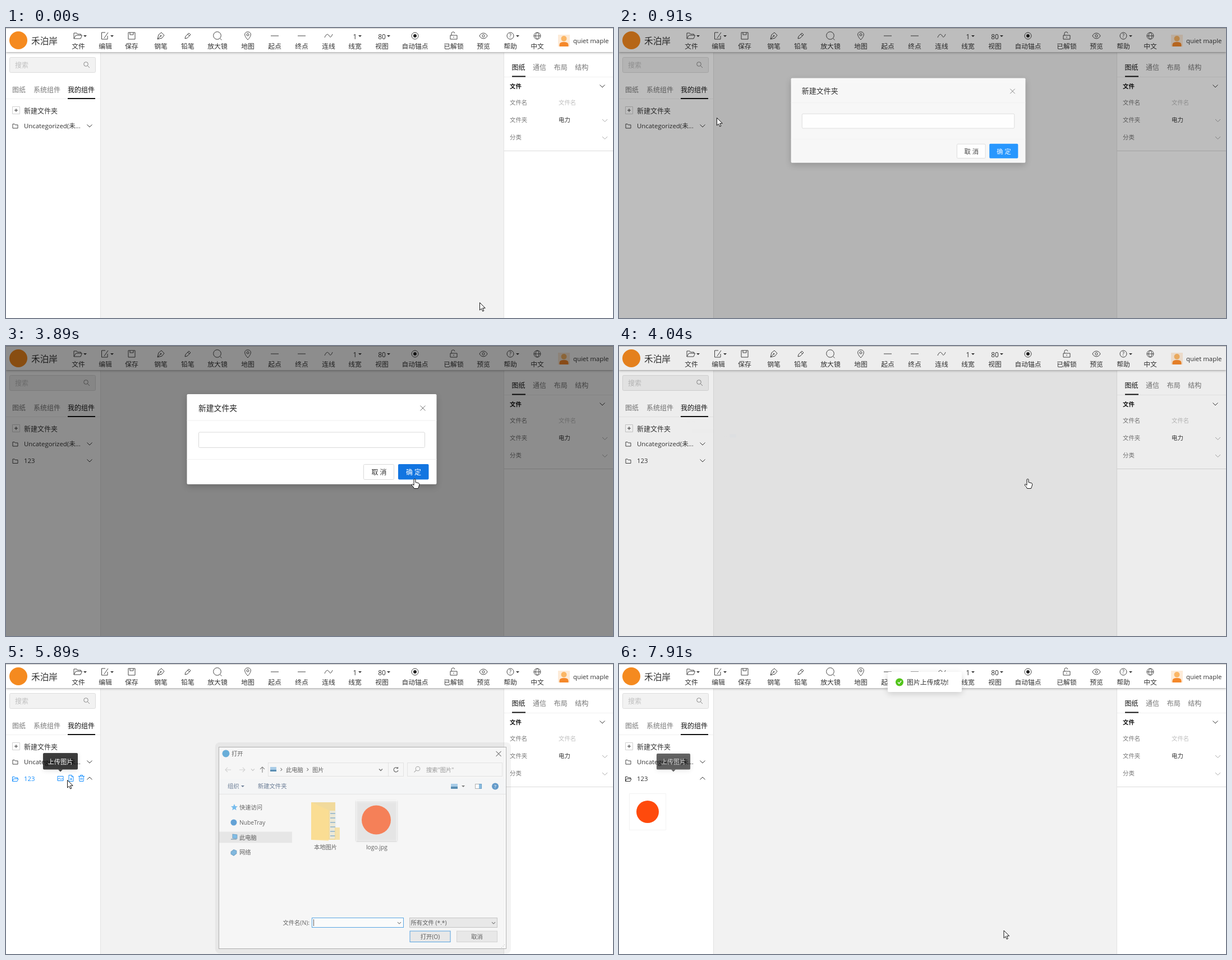
An HTML page with a canvas for the animation above (7990 ms loop, 1082x518 px).

```html
<!DOCTYPE html>
<html lang="zh">
<head>
<meta charset="utf-8">
<style>
  html, body { margin: 0; width: 100%; height: 100%; overflow: hidden; background: #fff; }
  canvas { display: block; width: 1082px; height: 518px; }
</style>
</head>
<body>
<canvas id="stage"></canvas>
<script>
const W = 1082, H = 518, LOOP = 7990;
const FONT = '"Open Sans","Noto Sans CJK SC","Noto Sans CJK",sans-serif';
const INK = '#333', GRAY = '#777', PALE = '#bfbfbf', BLUE = '#1890ff', RED = '#ff4a0c';
const stage = document.getElementById('stage'), c = stage.getContext('2d');
const dpr = window.devicePixelRatio || 1;
stage.width = W * dpr;
stage.height = H * dpr;

const progress = (t, a, b) => Math.min(1, Math.max(0, (t - a) / (b - a)));
const smooth = u => u * u * (3 - 2 * u);
const inOut = u => u < .5 ? 4 * u ** 3 : 1 - 4 * (1 - u) ** 3;
const circle = (r, x = 0, y = 0) => `M${x + r} ${y}a${r} ${r} 0 1 1 ${-2 * r} 0a${r} ${r} 0 1 1 ${2 * r} 0`;

// y is the vertical middle of the glyphs
function text(str, x, y, size = 12, color = INK, align = 'left', weight = 400) {
  c.font = `${weight} ${size}px ${FONT}`;
  c.textAlign = align;
  c.fillStyle = color;
  c.fillText(str, x, y + size * .38);
}
function box(x, y, w, h, fill, stroke, r = 0) {
  c.beginPath();
  c.roundRect(x, y, w, h, r);
  if (fill) { c.fillStyle = fill; c.fill(); }
  if (stroke) { c.strokeStyle = stroke; c.lineWidth = 1; c.stroke(); }
}
function icon(path, x, y, stroke = INK, fill, width = 1) {
  const p = new Path2D(path);
  c.save();
  c.translate(x, y);
  if (fill) { c.fillStyle = fill; c.fill(p); }
  if (stroke) { c.strokeStyle = stroke; c.lineWidth = width; c.stroke(p); }
  c.restore();
}
function shadowed(blur, dy, alpha, draw) {
  c.save();
  c.shadowColor = `rgba(0,0,0,${alpha})`;
  c.shadowBlur = blur;
  c.shadowOffsetY = dy;
  draw();
  c.restore();
}
function scaled(s, ox, oy, alpha, draw) {
  c.save();
  c.globalAlpha = alpha;
  c.translate(ox, oy);
  c.scale(s, s);
  c.translate(-ox, -oy);
  draw();
  c.restore();
}

const DOWN = 'M-4.5-2L0 2.5 4.5-2', UP = 'M-4.5 2L0-2.5 4.5 2', RIGHT = 'M-1.5-2.5L1 0-1.5 2.5';
const SMALL_DOWN = 'M-3-1.5L0 1.5 3-1.5', CARET_DOWN = 'M-3-1.5H3L0 1.5z';
const CROSS = 'M-4.5-4.5l9 9M4.5-4.5l-9 9';
const SEARCH = circle(3.8, -1, -1) + 'M2 2l3.5 3.5';
const FOLDER = 'M-4.5-3.5h3.2l1.2 1.5h4.6v6h-9z';
const OPEN_FOLDER = 'M-5 4v-8h3.5l1.2 1.5h4.3v2M-5 4l2-4.5h8.5l-2 4.5z';

const TOOLS = [
  ['文件', 129, 'M-7-5h5l1.5 2h6v2M-7-5V5H5l2.5-6h-11L-7 5', 128, 141],
  ['编辑', 177, 'M1-6h-6.5V6H5V0M6-6L-1 4', 176, 189],
  ['保存', 224, 'M-6-6H6V6H-6zM-3-6v4h6v-4', 224],
  ['钢笔', 276, 'M-6 6l2-8 5-4 5 5-4 5zM-6 6l5.5-5.5' + circle(1, 0, 0), 276],
  ['铅笔', 324, 'M-5 5l1-4 6-6 3 3-6 6zM0-3l3 3', 324],
  ['放大镜', 377, circle(6.8, -.5, -.5) + 'M4.5 4.5l3 3', 377],
  ['地图', 431, 'M0 7C-8-1-6-7 0-7S8-1 0 7z' + circle(2, 0, -2), 431],
  ['起点', 479, 'M-7 0H7', 479],
  ['终点', 527, 'M-7 0H7', 527],
  ['连线', 575, 'M-7 3C-4-4-1-4 1 0S5 2 7-3', 575],
  ['线宽', 622, '', 622, 631],
  ['视图', 670, '', 670, 682],
  ['自动锚点', 729, circle(6), 729],
  ['已解锁', 798, 'M-6-1H6v7H-6zM-4-1v-2.500a3 3 0 0 1 6-1M0 1.500v2', 798],
  ['预览', 851, 'M-7 0C-4-6.500 4-6.500 7 0C4 6.500-4 6.500-7 0z' + circle(2.2), 851],
  ['帮助', 899, circle(6), 899, 912],
  ['中文', 947, circle(6) + 'M-6 0H6M0-6C-4-3-4 3 0 6C4 3 4-3 0-6', 947],
];

function drawHeader() {
  shadowed(4, 1, .35, () => box(0, 0, W, 43, '#fff'));
  box(0, 0, W, 1, '#c4c4c4');
  icon(circle(16), 22, 22, null, '#f58a1f');
  text('禾泊岸', 45, 23, 15.7);
  for (const [label, x, path, ix, arrow] of TOOLS) {
    text(label, x, 32.5, 11.8, INK, 'center');
    icon(path, ix, 14, '#444');
    if (arrow) icon(CARET_DOWN, arrow, 14.5, null, INK);
  }
  text('1', 622, 15, 12, INK, 'center');
  text('80', 670, 15, 12, INK, 'center');
  text('?', 899, 14, 9, INK, 'center');
  icon(circle(3), 729, 14, null, '#222');
  box(984, 12, 21, 21, '#fdebd8');
  icon('M-8 10V7q0-5 8-5t8 5v3z', 994.5, 23, null, '#f5882a');
  icon(circle(5), 994.5, 19, null, '#fbb665');
  text('quiet maple', 1011, 22.5, 11.4);
}

function drawLeftPanel(t) {
  box(0, 44, 168, H, '#fff');
  box(168, 44, 1, H, '#e2e2e2');
  box(6.5, 52.5, 153, 27, '#f2f2f2', '#dcdcdc', 2);
  text('搜索', 16, 66.5, 12, PALE);
  icon(SEARCH, 143.5, 65.5, '#888');
  box(0, 126, 168, 1, '#f0f0f0');
  text('图纸', 11, 110, 12, GRAY);
  text('系统组件', 49, 110, 12, GRAY);
  text('我的组件', 110, 110, 12, '#111', 'left', 500);
  box(110, 125, 49, 2, '#111');

  const newColor = t > 430 && t < 760 ? BLUE : INK;
  box(11.5, 140.5, 13, 13, null, '#d0d0d0');
  icon('M-3 0H3M0-3V3', 18, 147, newColor);
  text('新建文件夹', 32, 148, 12, newColor);
  icon(FOLDER, 16.5, 175, '#444');
  text('Uncategorized(未...', 32, 175, 11.4);
  icon(DOWN, 149, 174.5);

  if (t < 3800) return;
  const hover = t >= 4960 && t < 7830, open = t >= 5260;
  const color = hover ? BLUE : INK;
  icon(open ? OPEN_FOLDER : FOLDER, 16.5, 205.5, open ? color : '#444');
  text('123', 32, 205, 11.4, color);
  icon(open ? UP : DOWN, 149, 204.5);
  if (hover) {
    icon('M-5-4H5V4H-5zM-5 2l3-3 3 3 2-2 2 2', 97, 204.5, BLUE);
    icon('M-4-5.500h5l3 3v8h-8zM1-5.500v3h3M-2 1.500h4M0-.5v4', 116, 204, BLUE);
    icon('M-5.500-3.500h11M-2-3.500v-2h4v2M-4-3.500l.5 9h7l.5-9M-1.200-1v4M1.200-1v4', 134.5, 204, BLUE);
  }
  if (t >= 7830) {
    box(18.5, 231.5, 65, 65, '#fff', '#f3f3f3');
    icon(circle(20), 51, 264, null, RED);
  }
}

function drawRightPanel() {
  box(888, 44, 194, H, '#fff');
  box(887, 44, 1, H, '#e2e2e2');
  ['图纸', '通信', '布局', '结构'].forEach((s, i) =>
    text(s, 901.5 + i * 37.6, 70.5, 12, i ? GRAY : '#111', 'left', i ? 400 : 500));
  box(888, 87, 194, 1, '#f0f0f0');
  box(902, 85.5, 24, 2, '#111');
  text('文件', 898, 104, 10.4, '#111', 'left', 700);
  icon(DOWN, 1063, 103.5);
  ['文件名', '文件夹', '分类'].forEach((s, i) => text(s, 898, 133.5 + i * 31, 10.4, GRAY));
  text('文件名', 985, 133.5, 10.4, PALE);
  text('电力', 985, 164.5, 10.4);
  icon(DOWN, 1067.5, 165, '#aaa');
  icon(DOWN, 1067.5, 196, '#aaa');
  box(888, 219, 194, 1, '#dcdcdc');
}

function drawModal(t) {
  if (t < 760 || t > 4090) return;
  const mask = .45 * progress(t, 796, 996) * (1 - progress(t, 3890, 4070));
  box(0, 0, W, H, `rgba(0,0,0,${mask})`);
  const k = (1 - (1 - progress(t, 834, 1034)) ** 5.3) * (1 - inOut(progress(t, 3890, 4070)));
  if (k <= 0) return;
  scaled(.2 + .8 * k, 61, 143, k, () => {
    shadowed(12, 4, .2, () => box(322.5, 86, 445, 161, '#fff', null, 2));
    text('新建文件夹', 343, 110.5, 13.8, '#222');
    icon(CROSS, 743, 111, GRAY);
    box(322.5, 132.5, 445, 1, '#f0f0f0');
    box(322.5, 202, 445, 1, '#f0f0f0');

    const focus = t >= 1600 && t < 3720;
    if (focus) box(342, 153, 406, 30, `rgba(24,144,255,${t < 1780 ? .12 : .2})`, null, 3);
    box(343.5, 154, 403, 27.5, '#fff', focus ? '#40a9ff' : '#d9d9d9', 2);
    if (t < 3800) {
      const typed = (t >= 2330) + (t >= 2480) + (t >= 2710);
      text('123'.slice(0, typed), 353.5, 168, 11.4, '#222');
      const caret = t < 2330 ? t < 2010 : t < 2710 || (t - 2710) % 1060 < 530;
      if (focus && caret) box(353.5 + 6.5 * typed, 160, 1, 16, '#000');
    }
    box(637.5, 211.5, 54, 27, '#fff', '#d9d9d9', 2);
    text('取 消', 665, 225.5, 12, INK, 'center');
    box(699, 211, 54.5, 27.5, t >= 3720 ? '#1275e1' : t >= 3600 ? '#40a9ff' : BLUE, null, 2);
    text('确 定', 726.5, 225.5, 12, '#fff', 'center');
  });
}

function drawTooltip(t) {
  const k = progress(t, 5480, 5600) * (1 - progress(t, 7880, 8030));
  if (k <= 0) return;
  scaled(.85 + .15 * k, 97, 192, k, () => {
    shadowed(8, 2, .15, () => box(66, 159, 62, 29.5, 'rgba(0,0,0,.75)', null, 2));
    icon('M-4 0H4L0 4z', 97, 188.5, null, 'rgba(0,0,0,.75)');
    text('上传图片', 97, 174.5, 11.3, '#fff', 'center');
  });
}

function drawMessage(t) {
  const k = 1 - (1 - progress(t, 7780, 7910)) ** 2;
  if (k <= 0) return;
  c.save();
  c.globalAlpha = k;
  c.translate(0, -20 * (1 - k));
  shadowed(12, 3, .16, () => box(479, 14, 132, 36, '#fff', null, 2));
  icon(circle(7), 500, 32.5, null, '#52c41a');
  icon('M-3 0l2.300 2.500 4-5', 500, 32.5, '#fff', null, 1.3);
  text('图片上传成功!', 513, 32.5, 11.9);
  c.restore();
}

function drawFileDialog(t) {
  const shown = .64 + .36 * progress(t, 5890, 5990), closing = progress(t, 7590, 7680);
  if (t < 5880 || closing >= 1) return;
  const small = (s, x, y, color = '#111', align) => text(s, x, y, 10.3, color, align);
  const selected = t >= 6750;
  scaled(1 + .03 * progress(t, 5890, 5990) - .05 * closing, 635.5, 328, shown * (1 - closing), () => {
    box(373, 140, 527, 377, 'rgba(0,0,0,.07)', null, 8);
    box(379.5, 148.5, 512, 360, '#fff', '#8c8c8c');

    icon(circle(6.5), 392, 160, null, '#1b86c8');
    small('打开', 402, 160.5);
    icon(CROSS, 878, 160.5);

    icon('M5 0H-5M-1-4L-5 0-1 4', 396, 189, '#bbb');
    icon('M-5 0H5M1-4L5 0 1 4', 421, 189, '#bbb');
    icon(SMALL_DOWN, 440, 189, '#aaa');
    icon('M0 5V-5M-4-1L0-5 4-1', 457, 189);
    box(467.5, 176.5, 241, 24, null, '#d9d9d9');
    box(681, 176, 1, 25, '#d9d9d9');
    box(471, 184, 11, 8, '#7fb6e0');
    box(471, 189, 11, 3, '#2d6a96');
    icon(RIGHT, 491, 188.5);
    small('此电脑', 499, 189);
    icon(RIGHT, 538, 188.5);
    small('图片', 546, 189);
    icon(SMALL_DOWN, 668, 189, INK, null, 1.4);
    icon('M3-3A4 4 0 1 0 4 1M3.500-5v2.500h-2.500', 695, 189, INK, null, 1.3);
    box(715.5, 176.5, 169, 24, null, '#d9d9d9');
    c.save();
    c.translate(733, 188);
    c.scale(-1, 1);
    icon(SEARCH, 0, 0, '#777');
    c.restore();
    small('搜索"图片"', 749, 189, '#666');

    box(380, 205, 511, 27, '#f5f6f7');
    box(380, 232, 511, 1, '#dcdcdc');
    small('组织', 395, 218.5, '#1e3960');
    icon(CARET_DOWN, 422, 218.5, null, '#1e3960');
    small('新建文件夹', 449, 218.5, '#1e3960');
    box(793, 214, 12, 9, '#7fb6e0');
    box(793, 219, 12, 4, '#2d6a96');
    icon(CARET_DOWN, 815, 218.5, null, INK);
    box(836.5, 214.5, 11, 8, '#fff', '#888');
    box(843, 214, 5, 9, '#4a9ad4');
    icon(circle(6), 872, 218.5, null, '#1266b0');
    text('?', 872, 218.5, 9, '#fff', 'center', 700);

    box(380, 299.5, 130, 20, '#dedede');
    icon('M0-6l1.700 4 4.300.3-3.300 2.800 1 4.200L0 3l-3.700 2.300 1-4.200L-6-1.700-1.700-2z', 407, 256, null, '#2f9be8');
    small('快速访问', 416, 256.5);
    icon(circle(5.5), 406, 283, null, '#1173c4');
    small('NubeTray', 416, 283);
    icon('M-4-5l8 1v7l-8-1z', 408, 309, '#5a8fb5', '#49a7e6');
    box(401, 312, 10, 2, '#7a98ac');
    small('此电脑', 416, 310);
    icon('M-5-1l5-4 5 2v5l-5 4-5-3z', 406, 336.5, '#5a8fb5', '#3f95d0');
    small('网络', 416, 336.5);

    box(544, 247, 43, 67, '#f0cc6c');
    box(577, 262, 12, 50, '#e9f1f8');
    for (let i = 0; i < 6; i++) box(578, 266 + i * 8, 9, 2, '#7aa9cc');
    icon('M0 0L31 14V69L0 67z', 544, 247, null, '#ffe08f');
    box(586, 292, 9, 22, '#f7d981');
    small('本地图片', 569.5, 327, '#111', 'center');
    if (selected) box(619.5, 238.5, 83, 99, '#cce8ff', '#99d1ff');
    shadowed(3, 1, .4, () => box(624, 243, 73, 73, '#fff'));
    icon(circle(26), 660, 278.5, null, RED);
    small('logo.jpg', 661, 327, '#111', 'center');

    small('文件名(N):', 541, 462.5, '#111', 'right');
    box(545.5, 453.5, 163, 17, '#fff', '#0078d7');
    if (selected) small('logo.jpg', 549, 462);
    else box(548, 456, 1, 12, '#000');
    icon(SMALL_DOWN, 701, 462.5);
    box(719.5, 453.5, 156, 17, '#e1e1e1', '#adadad');
    small('所有文件 (*.*)', 721.5, 462.5);
    icon(SMALL_DOWN, 869, 462.5);
    box(720, 477, 72, 19.5, t > 7400 ? '#e5f1fb' : '#e1e1e1', '#0078d7');
    small('打开(O)', 756, 487, '#111', 'center');
    box(803.5, 477, 72, 19.5, '#e1e1e1', '#c4c4c4');
    small('取消', 839.5, 487, '#111', 'center');
    for (let i = 0; i < 3; i++) box(883 + 2.500 * i, 506 - 2.500 * i, 1, 1, '#999');
  });
}

// time, x, y, shape until the next entry
const POINTER = [
  [0, 844, 490, 'arrow'], [40, 844, 490, 'arrow'], [440, 52, 140, 'arrow'],
  [590, 52, 136, 'hand'], [740, 52, 136, 'arrow'], [910, 174, 160, 'arrow'],
  [1250, 346, 165, 'beam'], [1520, 377, 167, 'beam'], [2830, 377, 167, 'beam'],
  [2980, 410, 184, 'arrow'], [3450, 712, 256, 'arrow'], [3600, 728, 238, 'hand'],
  [4130, 728, 238, 'arrow'], [4240, 728, 238, 'arrow'], [5030, 88, 207, 'arrow'],
  [5110, 88, 207, 'hand'], [5260, 88, 207, 'hand'], [5600, 97, 206, 'hand'],
  [5830, 97, 206, 'arrow'], [5890, 109, 207, 'arrow'], [6680, 660, 284, 'arrow'],
  [6820, 660, 284, 'arrow'], [7450, 740, 485, 'arrow'], [7590, 740, 485, 'arrow'],
  [7900, 685.5, 475.5, 'arrow'], [LOOP, 685.5, 475.5, 'arrow'],
];
const SHAPES = {
  arrow: 'M0 0V13.500L3-10.500 3 10.700 5.200 15.500 7.300 14.600 5.200 9.800H9.700z'.replace('L3-10.500 3', 'L3'),
  hand: 'M-1.500.5a1.500 1.500 0 0 1 3 0V5l5 1.200q2 .6 1.800 3L7.500 12 6 16H-1Q-2 13-5 10.500q-1-2 1-2.300l2.500 2z',
  beam: 'M-4-7h3l1 1 1-1h3M0-6V7M-4 8h3l1-1 1 1h3',
};

function drawPointer(t) {
  const i = POINTER.findIndex((p, n) => t < POINTER[n + 1][0]);
  const [t0, x0, y0, shape] = POINTER[i], [t1, x1, y1] = POINTER[i + 1];
  const k = smooth(progress(t, t0, t1));
  const x = x0 + (x1 - x0) * k, y = y0 + (y1 - y0) * k;
  icon(SHAPES[shape], x + .5, y + .5, '#111', shape === 'beam' ? null : '#fff', shape === 'beam' ? 1.4 : 1);
}

function draw(t) {
  c.setTransform(dpr, 0, 0, dpr, 0, 0);
  box(0, 0, W, H, '#f2f2f2');
  drawLeftPanel(t);
  drawRightPanel();
  drawHeader();
  drawModal(t);
  drawTooltip(t);
  drawMessage(t);
  drawFileDialog(t);
  drawPointer(t);
}

const start = performance.now();
function tick() {
  draw((performance.now() - start) % LOOP);
  requestAnimationFrame(tick);
}
tick();
</script>
</body>
</html>
```
